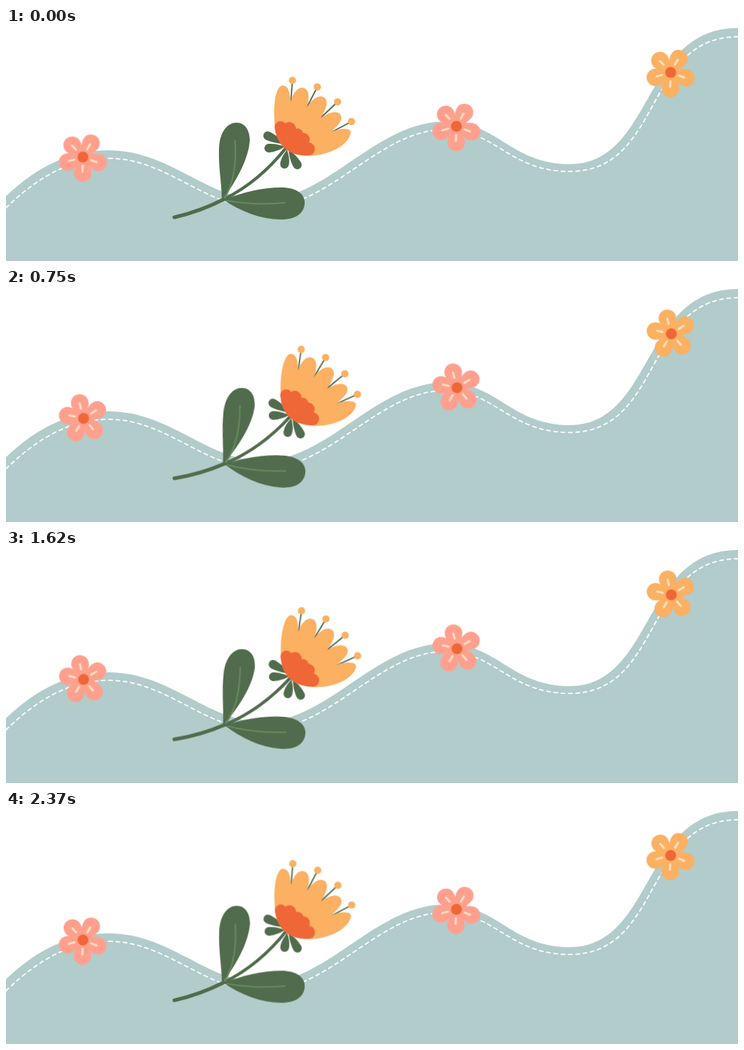
An HTML page that plays this animation: 1000 px wide and 320 px high, repeating every 2400 ms.

```html
<!DOCTYPE html>
<html lang="en">
<head>
<meta charset="utf-8">
<title>Flowers on a hill</title>
<style>
  html, body { margin: 0; width: 100%; height: 100%; overflow: hidden; background: #fff; }
  svg { display: block; width: 100%; height: 100%; }
  .line { fill: none; stroke-linecap: round; }
  .green { fill: #516c4c; }
  .stem { stroke: #516c4c; }
  .rib { stroke: #648a5e; stroke-width: 2; }
  .gold { fill: #fbb062; }
  .pink { fill: #ffa08e; }
  .red { fill: #ef6737; }
  .vein { stroke: #fee0c2; stroke-width: 2.8; }
</style>
</head>
<body>
<svg viewBox="0 0 1000 320">
  <path fill="#b1cccb" d="M0 231C45 188 90 168 140 168C225 168 275 236 350 236C439 236 505 128.5 600 128.5C672 128.5 690 187 770 187C886 187 868 0 1000 0V320H0Z"/>
  <path class="line" stroke="#fff" stroke-width="1.8" stroke-dasharray="5 5" d="M0 247C45 203 90 179 140 179C221 179 271 247 350 247C443 247 509 139.5 600 139.5C669 139.5 687 197 770 197C898 197 871 12 1000 12"/>
  <g id="blooms"></g>
  <g id="plant">
    <path class="green" d="M295 236C294 208 290 190 291 165C292 143 302 130 315 130C327 130 333 141 333 154C332 179 313 214 295 236Z"/>
    <path class="green" d="M297 236C322 226 350 219 376 219C397 219 408 228 408 240C408 254 396 263 376 263C348 263 321 252 297 236Z"/>
    <path class="line stem" stroke-width="5" d="M230 260Q265 252 298 235"/>
    <path class="line stem" stroke-width="4.4" d="M298 235Q346 211 383 164"/>
    <path class="line rib" d="M299 233Q316 205 313 155M302 237Q340 244 381 240"/>
    <g id="sepals" class="green"></g>
    <g id="stamens"></g>
    <path class="gold" d="M368 140C364 115 367 79 378 79C387 79 388 92 389 101C392 88 399 82 404 82C413 82 416 92 411 109C417 99 425 93 431 94C441 96 440 107 430 124C438 117 449 113 455 117C462 123 457 132 443 143C455 138 470 136 471 143C470 159 443 177 407 175.5C385 172 372 160 368 140Z"/>
    <g id="cup" class="red">
      <path d="M367 135C369 160 385 176 412 175Q421 175 421 168L413 157L400 142L376 130Z"/>
    </g>
  </g>
</svg>
<script>
  const LOOP = 2400;
  const byId = id => document.getElementById(id);

  function add(parent, tag, attrs) {
    const el = document.createElementNS('http://www.w3.org/2000/svg', tag);
    for (const key in attrs) el.setAttribute(key, attrs[key]);
    return parent.appendChild(el);
  }

  const dot = (parent, cx, cy, r, cls) =>
    add(parent, 'circle', cls ? { cx, cy, r, class: cls } : { cx, cy, r });

  // Turn clockwise and back at constant speed, in 30 ms steps.
  function swing(el, degrees) {
    const easing = 'steps(40, end)';
    el.animate([
      { transform: 'rotate(0deg)', easing },
      { transform: `rotate(${degrees}deg)`, easing },
      { transform: 'rotate(0deg)' }
    ], { duration: LOOP, iterations: Infinity });
  }

  function bloom(x, y, color) {
    const place = add(byId('blooms'), 'g', { transform: `translate(${x} ${y})` });
    const spin = add(place, 'g', {});
    const head = add(spin, 'g', { transform: 'translate(.6 -2)' });
    const petals = [-42, 30, 110, 181, 252];
    const veins = [-43, 29, 111, 182, 254];
    dot(head, 0, 0, 15, color);
    for (const a of petals) {
      add(head, 'path', {
        class: color,
        transform: `rotate(${a})`,
        d: 'M-6 -6C-9 -12 -12 -17 -12 -22A12 12 0 0 1 12 -22C12 -17 9 -12 6 -6Z'
      });
    }
    veins.forEach((a, i) => add(head, 'path', {
      class: 'line vein',
      transform: `rotate(${a})`,
      d: i ? 'M0 -12V-20' : 'M0 -14V-21.5'
    }));
    dot(head, 0, 0, 7.5, 'red');
    swing(spin, 45);
  }

  // Teardrop from a pointed base to a round tip.
  function sepal(baseX, baseY, x, y) {
    const dx = x - baseX, dy = y - baseY;
    const len = Math.hypot(dx, dy);
    const turn = Math.atan2(dy, dx) * 180 / Math.PI;
    add(byId('sepals'), 'path', {
      transform: `translate(${baseX} ${baseY}) rotate(${turn})`,
      d: `M0 0C6 -3 ${len - 8} -6 ${len} -6A6 6 0 0 1 ${len} 6C${len - 8} 6 6 3 0 0Z`
    });
  }

  function stamen(x1, y1, x2, y2) {
    add(byId('stamens'), 'path', {
      class: 'line stem', 'stroke-width': 1.8, d: `M${x1} ${y1}L${x2} ${y2}`
    });
    dot(byId('stamens'), x2, y2, 5, 'gold');
  }

  [[381, 159, 357.5, 148], [381, 163, 359, 165],
   [384, 167, 380.5, 187], [386, 167, 398, 188]].forEach(s => sepal(...s));
  [[389, 103, 391.3, 72], [410, 111, 425.3, 81],
   [428, 125, 453, 101.5], [441, 145, 472, 128.5]].forEach(s => stamen(...s));
  [[375, 136, 8], [387, 138, 9], [398, 146, 8],
   [406, 153, 9], [413, 166, 9]].forEach(c => dot(byId('cup'), ...c));

  bloom(104.5, 179.2, 'pink');
  bloom(614.7, 137, 'pink');
  bloom(907.4, 63, 'gold');

  const plant = byId('plant');
  plant.style.transformOrigin = '229px 260px';
  swing(plant, 6);
</script>
</body>
</html>
```
